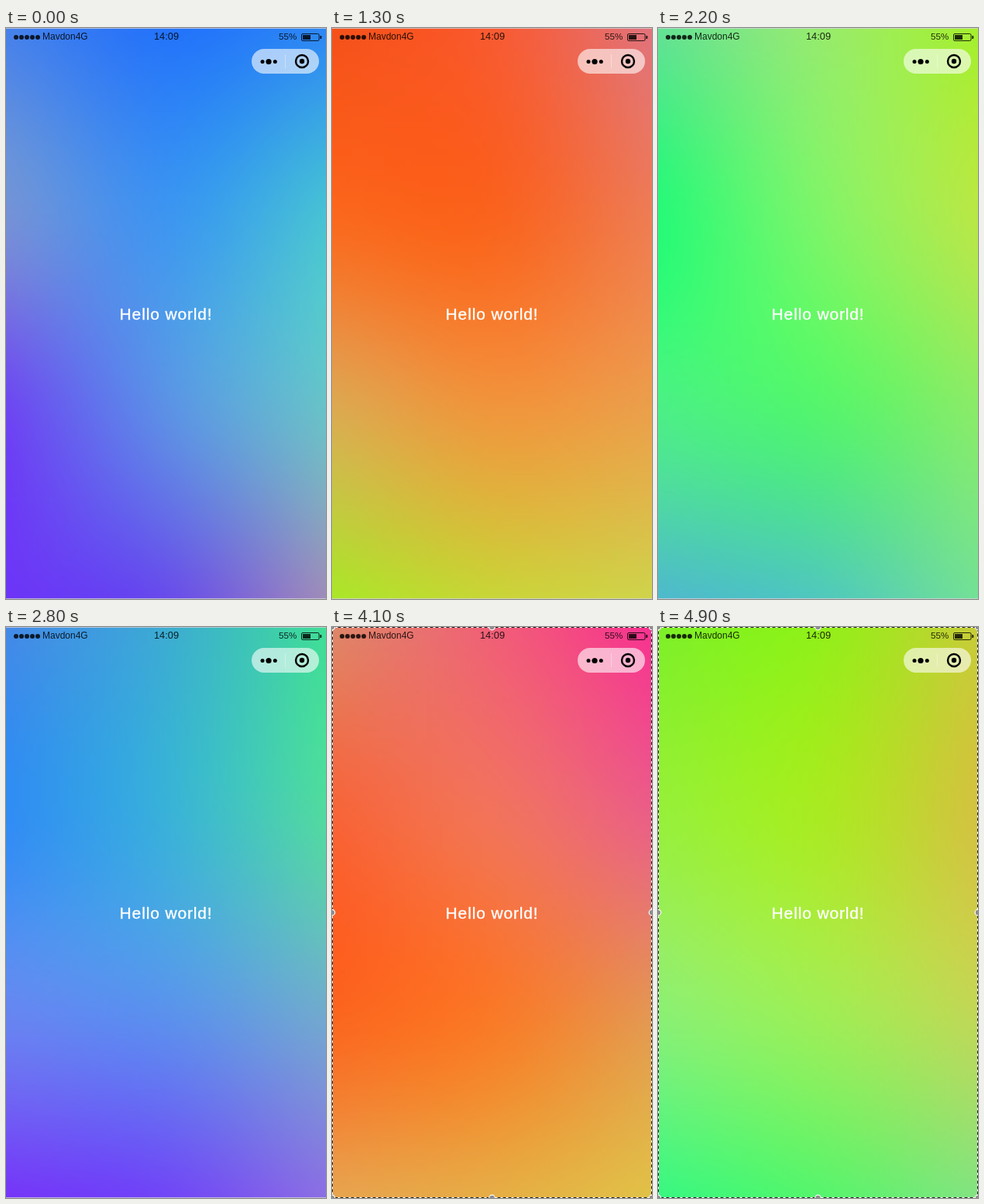
An HTML page with a canvas for the animation above (5 s loop, 413x738 px).

```html
<!DOCTYPE html>
<html lang="en">
<head>
<meta charset="utf-8">
<title>Colour flow</title>
<style>
  html, body { margin: 0; width: 100%; height: 100%; overflow: hidden; }
  body { position: relative; }
  canvas, svg { position: absolute; left: 0; top: 0; width: 413px; height: 738px; display: block; }
  text { font-family: "Liberation Sans", Arial, sans-serif; }
</style>
</head>
<body>
<canvas id="flow" width="59" height="106"></canvas>
<svg viewBox="0 0 413 738">
  <path d="M0 .5H413M0 737.5H413" stroke="#d4d4dc" stroke-opacity=".75"/>

  <g fill="#000" fill-opacity=".82">
    <circle cx="13" cy="12" r="3"/>
    <circle cx="20" cy="12" r="3"/>
    <circle cx="27" cy="12" r="3"/>
    <circle cx="34" cy="12" r="3"/>
    <circle cx="41" cy="12" r="3"/>
    <text x="47" y="15" font-size="12">Mavdon4G</text>
    <text x="207" y="15" font-size="12.8" text-anchor="middle">14:09</text>
    <text x="352" y="15.3" font-size="11.6">55%</text>
    <rect x="383" y="9" width="10" height="6"/>
    <path d="M405.3 10h1a1 1 0 0 1 1 1v2a1 1 0 0 1-1 1h-1z"/>
  </g>
  <rect x="381.5" y="7.5" width="22.5" height="9" rx="1.5" fill="none" stroke="#000" stroke-opacity=".82"/>

  <rect x="317" y="27" width="87" height="32" rx="16" fill="#fff" fill-opacity=".6"/>
  <path d="M360.5 34V52" stroke="#fff" stroke-opacity=".35"/>
  <circle cx="331" cy="43.5" r="2.5"/>
  <circle cx="339" cy="43.5" r="3.6"/>
  <circle cx="347.3" cy="43.5" r="2.5"/>
  <circle cx="382" cy="43" r="8" fill="none" stroke="#000" stroke-width="2.4"/>
  <circle cx="382" cy="43" r="3.2"/>

  <text x="146.6" y="377" font-size="21" letter-spacing=".85" fill="#fff" stroke="#fff" stroke-width=".35">Hello world!</text>

  <g id="frame" visibility="hidden">
    <rect x=".5" y=".5" width="412" height="737" fill="none" stroke="#fff"/>
    <rect x=".5" y=".5" width="412" height="737" fill="none" stroke="#222" stroke-dasharray="4 3"/>
    <g id="grips" fill="#8c8c8c" stroke="#fff" stroke-width="1.2"></g>
  </g>
</svg>
<script>
const LOOP = 5000, STEP = 100, CYCLE = 3000, FRAME_ON = 3500;
const COLS = 3, ROWS = 4;

// Mesh colours: one line per pose, rows from top to bottom, three per row.
const poses = {
  blue:   "4682eb 2473fa 2d87f5  7691d7 3e96f0 48c3d4  6e46f2 5c91e6 69c3c8  6c34f8 694beb a08cb9",
  violet: "962deb 6e32f5 6e73f0  874beb 5f3cf8 6487e8  d74bb9 9669d2 8796b9  f83291 eb5a96 e4946e",
  pink:   "e15f96 b45fc8 5f46f5  fa2682 c850b9 7d64e1  f35882 eb5f87 c38c96  f86932 f87634 e4965a",
  amber:  "de8769 f05f78 f83291  f86437 f2735a eb5f87  fc641e fa7828 e49655  e8a550 e6af46 e1c346",
  orange: "f55019 f85a32 e1737d  fa691e fa641e ee7d55  dcaa50 f0963c eba04b  aae828 c8d737 d0d44b",
  lime:   "7df028 91f019 c8cd37  96f03c aaeb23 d4c341  8cf073 a0ee55 c3d755  37f882 55f56e 82e482",
  green:  "64e196 96eb6e a5f02d  26fa78 7df569 b9e846  4bf087 55f56e 8ceb69  4eb9cd 50c8be 73e196"
};

// Time, pose, and how many thirds of the colour wheel it is turned by.
const steps = [
  [0, "blue", 0], [200, "green", 1], [400, "violet", 0], [700, "pink", 0],
  [900, "lime", 2], [1100, "amber", 0], [1300, "orange", 0], [1700, "pink", 1],
  [1900, "lime", 0], [2200, "green", 0], [2400, "violet", 2], [2700, "pink", 2],
  [2900, "lime", 1], [CYCLE, "blue", 0]
].map(([time, name, turn]) => ({ time, mesh: readMesh(poses[name], turn) }));

function readMesh(line, turn) {
  return line.split(/\s+/).map(hex => {
    const rgb = [0, 2, 4].map(i => parseInt(hex.slice(i, i + 2), 16));
    return rgb.map((_, c) => rgb[(c - turn + 3) % 3]);
  });
}

function meshAt(time) {
  const i = steps.findIndex(s => s.time > time);
  const a = steps[i - 1], b = steps[i];
  const k = (time - a.time) / (b.time - a.time);
  return a.mesh.map((rgb, n) => rgb.map((v, c) => v + (b.mesh[n][c] - v) * k));
}

// Smooth curve through evenly spaced values, u from 0 to 1.
function curve(vals, u) {
  const last = vals.length - 1;
  const i = Math.min(last - 1, Math.floor(u * last)), f = u * last - i;
  const b = vals[i], c = vals[i + 1];
  const a = i > 0 ? vals[i - 1] : 2 * b - c;
  const d = i + 2 <= last ? vals[i + 2] : 2 * c - b;
  return b + f / 2 * (c - a + f * (2 * a - 5 * b + 4 * c - d + f * (3 * (b - c) + d - a)));
}

const canvas = document.getElementById("flow");
const ctx = canvas.getContext("2d");
const { width: W, height: H } = canvas;
const img = ctx.createImageData(W, H);
img.data.fill(255);

function paint(time) {
  const mesh = meshAt(time % CYCLE);
  for (let c = 0; c < 3; c++) {
    for (let y = 0; y < H; y++) {
      const row = [];
      for (let x = 0; x < COLS; x++) {
        const col = [];
        for (let r = 0; r < ROWS; r++) col.push(mesh[r * COLS + x][c]);
        row.push(curve(col, (y + .5) / H));
      }
      for (let x = 0; x < W; x++) img.data[(y * W + x) * 4 + c] = curve(row, (x + .5) / W);
    }
  }
  ctx.putImageData(img, 0, 0);
}

const frame = document.getElementById("frame");
const grips = document.getElementById("grips");
for (const x of [0, 206.5, 413]) {
  for (const y of [0, 369, 738]) {
    if (x === 206.5 && y === 369) continue;
    const dot = document.createElementNS("http://www.w3.org/2000/svg", "circle");
    dot.setAttribute("cx", x);
    dot.setAttribute("cy", y);
    dot.setAttribute("r", 3.8);
    grips.append(dot);
  }
}

const start = performance.now();
let shown = -1;
function tick() {
  const time = Math.floor((performance.now() - start) % LOOP / STEP) * STEP;
  if (time !== shown) {
    shown = time;
    paint(time);
    frame.setAttribute("visibility", time >= FRAME_ON ? "visible" : "hidden");
  }
  requestAnimationFrame(tick);
}
tick();
</script>
</body>
</html>
```
